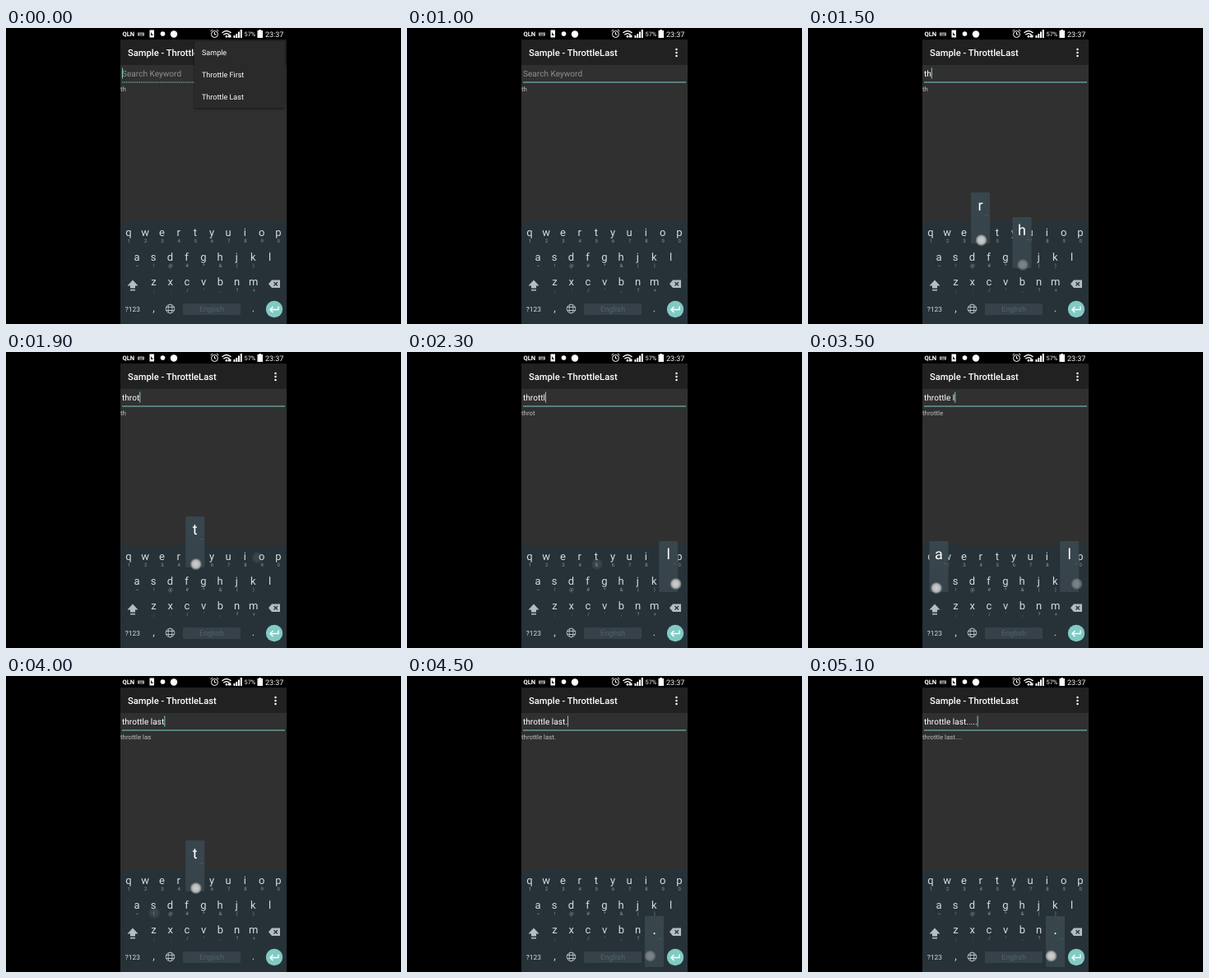
An HTML page that plays this animation: 480x360 px, repeating every 5200 ms.

```html
<!DOCTYPE html>
<html lang="en">
<head>
<meta charset="utf-8">
<title>Throttle sample</title>
<style>
  html, body { margin: 0; width: 100%; height: 100%; overflow: hidden; background: #000; }
  svg { display: block; width: 480px; height: 360px; }
  text { font-family: Roboto, sans-serif; text-rendering: geometricPrecision; white-space: pre; }
  .mid { text-anchor: middle; }
  .key { font-size: 13px; fill: #d6dbdd; }
  .alt { font-size: 6px; fill: #8b979c; }
  .big { font-size: 18px; fill: #fff; }
  .line { fill: none; stroke: #fff; }
  .item { font-size: 9px; fill: #fff; }
</style>
</head>
<body>
<svg id="stage" viewBox="0 0 480 360">
  <defs>
    <radialGradient id="touch">
      <stop offset="0" stop-color="#d8d8d8"/>
      <stop offset=".6" stop-color="#bcc0c1"/>
      <stop offset=".85" stop-color="#7d8587" stop-opacity=".8"/>
      <stop offset="1" stop-color="#50595d" stop-opacity="0"/>
    </radialGradient>
    <linearGradient id="bubble" x2="0" y2="1">
      <stop offset="0" stop-color="#38464d"/>
      <stop offset="1" stop-color="#36434a"/>
    </linearGradient>
    <filter id="shade" x="-10%" y="-10%" width="120%" height="125%">
      <feDropShadow dx="0" dy="1.5" stdDeviation="1.5" flood-opacity=".5"/>
    </filter>
  </defs>

  <rect width="480" height="360"/>
  <rect x="139" y="14" width="202" height="222" fill="#303030"/>
  <rect x="139" y="14" width="202" height="31" fill="#212121"/>

  <!-- status bar -->
  <g fill="#fff">
    <text x="141.5" y="10" font-size="7.6" font-weight="700">QLN</text>
    <path d="M160 5.5h8v4h-8z" fill="#aaa"/>
    <path d="M161 7h6M162 8.5h4" stroke="#222" stroke-width=".7"/>
    <path d="M174.500 2.500h5.500v9h-5.500z"/>
    <path d="M176 5l3 4h-3z" fill="#222"/>
    <circle cx="190.500" cy="7" r="2.800"/>
    <circle cx="204" cy="7.500" r="4.200"/>
    <g class="line">
      <circle cx="253.500" cy="7.500" r="4"/>
      <path d="M253.500 5v3h2M248.500 4l2.500-2M258.500 4l-2.500-2"/>
      <path d="M262.500 6q5.500-5 11 0M264.300 8.300q3.700-3.300 7.400 0" stroke-width="1.400"/>
    </g>
    <circle cx="268" cy="10.300" r="1.400"/>
    <path d="M270 8.500h3.500v3h-3.500z"/>
    <path d="M276.500 9h2v3h-2zM279.300 7h2v5h-2zM282 4.500h2v7.500h-2zM284.800 2h2v10h-2z"/>
    <text x="289.500" y="10" font-size="7.400">57%</text>
    <path d="M305.500 3h2v-1h2.500v1h2v9h-6.500z"/>
    <text x="315" y="10.700" font-size="9">23:37</text>
  </g>

  <text id="title" x="148" y="34" font-size="11.2" font-weight="500" fill="#fff"></text>
  <g fill="#fff">
    <circle cx="327.500" cy="26" r="1.250"/>
    <circle cx="327.500" cy="30" r="1.250"/>
    <circle cx="327.500" cy="34" r="1.250"/>
  </g>

  <text id="hint" x="141" y="59" font-size="10.1" fill="#8f8f8f">Search Keyword</text>
  <text id="input" x="141" y="59" font-size="10.1" fill="#fff"></text>
  <rect id="caret" y="48.500" width="1" height="13" fill="#80cbc4"/>
  <path id="rule" d="M141 66h198" stroke="#80cbc4" stroke-width="1.100"/>
  <text id="result" x="139" y="77.300" font-size="7.85" fill="#c0c0c0"></text>

  <g id="menu">
    <rect x="229" y="16" width="110" height="81" fill="#2b2b2b" filter="url(#shade)"/>
    <rect id="press" x="229" y="71" width="110" height="26" fill="#3b3b3b"/>
    <text class="item" x="238" y="33">Sample</text>
    <text class="item" x="238" y="60">Throttle First</text>
    <text class="item" x="238" y="87">Throttle Last</text>
  </g>

  <rect x="139" y="236" width="202" height="124" fill="#263238"/>
  <g id="keys"></g>
  <g fill="#b4bdc1">
    <path d="M154 306.500l6.500 7h-3.500v3h-6v-3h-3.500zM151 318h6v1.500h-6z"/>
    <path d="M323 306.500h10v9.500h-10l-4-4.750z"/>
    <path d="M325.500 309l4.500 4.500M330 309l-4.500 4.500" stroke="#263238" stroke-width="1.200"/>
    <text x="144.800" y="345" font-size="8.4" fill="#d6dbdd">?123</text>
  </g>
  <g fill="none" stroke="#b4bdc1">
    <circle cx="199.500" cy="341.500" r="5.300"/>
    <ellipse cx="199.500" cy="341.500" rx="2.400" ry="5.300"/>
    <path d="M194.700 339.500h9.600M194.700 343.500h9.600"/>
  </g>
  <rect x="215" y="335" width="70" height="14" rx="1.500" fill="#35424a"/>
  <text id="lang" class="mid" x="250" y="345.300" font-size="9.3">English</text>
  <circle cx="326" cy="342" r="10.200" fill="#80cbc4"/>
  <path class="line" d="M331 338.500v4h-9.500M324.500 339l-3.500 3.500 3.500 3.500" stroke-width="1.400"/>

  <g id="taps"></g>
</svg>

<script>
const LOOP = 5200, STEP = 100, MENU_PICK = 500;
const $ = id => document.getElementById(id);

function add(parent, tag, attrs, text = '') {
  const el = document.createElementNS('http://www.w3.org/2000/svg', tag);
  for (const name in attrs) el.setAttribute(name, attrs[name]);
  el.textContent = text;
  parent.append(el);
  return el;
}

// letters, secondary symbols, first centre, baseline
const rows = [
  ['qwertyuiop', '1234567890', 149, 253],
  ['asdfghjkl', '~!@#*&()', 159, 283],
  ['zxcvbnm', ";:/',?+", 179.5, 313],
];
const keys = { ',': [179.5, 345], '.': [300.5, 345], ' ': [235, 341] };

for (const [letters, alts, x0, y] of rows) {
  [...letters].forEach((c, i) => {
    keys[c] = [x0 + i * 20.2, y];
    if (alts[i]) add($('keys'), 'text', { class: 'alt mid', x: keys[c][0] + .5, y: y + 7.5 }, alts[i]);
  });
}
for (const c in keys) {
  if (c !== ' ') add($('keys'), 'text', { class: 'key mid', x: keys[c][0], y: keys[c][1] }, c);
}

// finger position relative to the key's baseline
const nudge = { a: [-3, 4], l: [6, -1], o: [-5, -3], '.': [-5, -4.5], ' ': [.5, 8] };
const phrase = 'throttle last.....';
const downs = [1100, 1300, 1500, 1600, 1800, 2000, 2200, 2400, 2600,
               3300, 3500, 3700, 3900, 4300, 4600, 4700, 4900, 5000];
const fade = [.95, .95, .45, .12];

const addDot = (x, y) => add($('taps'), 'circle', { cx: x, cy: y, r: 7.5, fill: 'url(#touch)' });

const taps = [...phrase].map((c, i) => {
  const [x, y] = keys[c];
  const [dx, dy] = nudge[c] || [1, 5];
  const bubble = add($('taps'), 'g', {});
  if (c !== ' ') {
    const bx = Math.min(x, 317.7);
    add(bubble, 'rect', { x: bx - 11.5, y: y - 53, width: 23, height: 62, rx: 1, fill: 'url(#bubble)' });
    add(bubble, 'text', { class: 'big mid', x: bx, y: y - 31 }, c);
    add(bubble, 'text', { class: 'alt mid', x: bx + 7.5, y: y - 25 }, '…');
  }
  return { c, down: downs[i], bubble, dot: addDot(x + dx, y + dy) };
});
for (const tap of taps) $('taps').append(tap.dot);
const pick = { down: 200, dot: addDot(287, 85) };

const show = (el, on) => { el.style.display = on ? '' : 'none'; };
const setDot = (tap, t) => { tap.dot.style.opacity = fade[(t - tap.down) / STEP] || 0; };
const typed = t => phrase.slice(0, downs.filter(d => d + 100 <= t).length);

// emits the latest text once per 600 ms window
const throttled = t => t < 1450 ? 'th' : typed(250 + 600 * Math.floor((t - 250) / 600));

function draw(t) {
  const open = t < MENU_PICK, text = typed(t);
  $('title').textContent = 'Sample - Throttle' + (open ? 'First' : 'Last');
  $('menu').style.opacity = open ? 1 : t < MENU_PICK + STEP ? .5 : 0;
  show($('press'), t >= pick.down);
  $('rule').setAttribute('stroke-dasharray', open ? '1.3 1' : 'none');

  show($('hint'), !text);
  $('input').textContent = text;
  $('result').textContent = throttled(t);
  const edited = text ? downs[text.length - 1] + 100 : MENU_PICK;
  $('caret').setAttribute('x', 141 + (text ? $('input').getComputedTextLength() : 0));
  show($('caret'), open || (t - edited) % 1000 < 500);

  let spaceDown = false;
  for (const tap of taps) {
    const age = t - tap.down, held = age >= 0 && age <= 200;
    show(tap.bubble, held);
    setDot(tap, t);
    if (held && tap.c === ' ') spaceDown = true;
  }
  setDot(pick, t);
  $('lang').setAttribute('fill', spaceDown ? '#44525a' : '#53616a');
}

const start = performance.now();
function tick() {
  const t = (performance.now() - start) % LOOP;
  draw(Math.floor(t / STEP) * STEP);
  requestAnimationFrame(tick);
}
tick();
</script>
</body>
</html>
```
